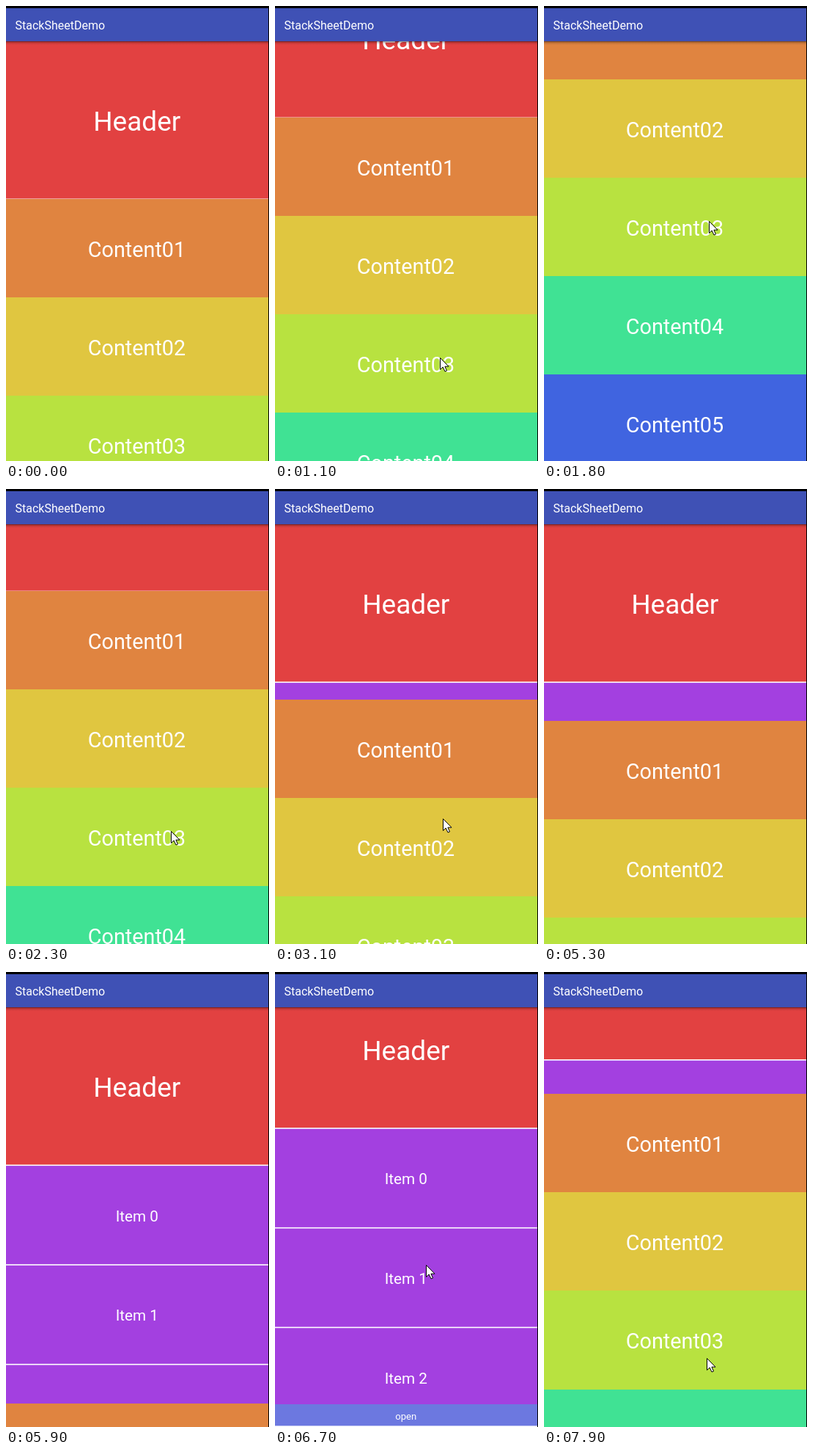
These frames come from a looping animation (359 px wide and 620 px high, 8 s). An HTML page with a canvas:

```html
<!DOCTYPE html>
<html lang="en">
<head>
<meta charset="utf-8">
<title>Layered sheet scrolling</title>
<style>
html, body { margin: 0; width: 100%; height: 100%; overflow: hidden; background: #000; }
canvas { display: block; }
</style>
</head>
<body>
<canvas id="stage" width="359" height="620"></canvas>
<script>
const ctx = document.getElementById('stage').getContext('2d');
const LOOP = 8000, STEP = 100;
const WIDTH = 358, HEIGHT = 620, BAR_BOTTOM = 48, LIST_TOP = 263;
const BLOCK = 134.1, ITEM = 135.7, DIVIDER = 1.6;
const blockColors = ['#e08440', '#e0c640', '#b8e240', '#40e294', '#4064e0'];

const ramp = (t, from, to) => Math.min(1, Math.max(0, (t - from) / (to - from)));
const smooth = u => u * u * (3 - 2 * u);
const easeOut = u => 1 - (1 - u) ** 1.71;
const tug = (t, from, to, peak) => peak * Math.sin(Math.PI * ramp(t, from, to));

// How far the page is scrolled up
function scrollAt(t) {
  if (t < 1800) return 297 * ramp(t, 0, 1800) ** 2;
  if (t < 2700) return 297 * (1 - smooth(ramp(t, 1800, 2700)));
  return 143.5 * smooth(ramp(t, 6235, 7400));
}

// How far the sheet is dragged down from its resting place
function pullAt(t) {
  return tug(t, 2700, 3700, 25.2) + tug(t, 3700, 4900, 51.8) + 81 * ramp(t, 4900, 5400) ** 1.9;
}

function sheetTop(t) {
  const rest = LIST_TOP - scrollAt(t);
  if (t > 7600) return HEIGHT + (rest - HEIGHT) * easeOut(ramp(t, 7600, 8000));
  const pulled = rest + pullAt(t);
  return pulled + (HEIGHT - pulled) * easeOut(ramp(t, 5400, 6100));
}

const gestures = [
  { from: 100, to: 2300, x: () => 225, y: t => 590 - scrollAt(t) },
  { from: 2700, to: 5200, x: t => 229 - 29 * ramp(t, 3100, 4400), y: t => 426.8 + 0.92 * pullAt(t) },
  { from: 6300, to: 7000, x: () => 206, y: t => 449.4 - scrollAt(t) },
  { from: 7700, to: 7900, x: () => 222, y: t => 575 - 49 * ramp(t, 7700, 7900) }
];

function rect(color, y, height) {
  ctx.fillStyle = color;
  ctx.fillRect(0, y, WIDTH, height);
}

function label(text, baseline, size, x = 178.8, align = 'center') {
  ctx.font = `${size}px Roboto, sans-serif`;
  ctx.textAlign = align;
  ctx.fillStyle = '#fff';
  ctx.fillText(text, x, baseline);
}

function drawList(offset) {
  const top = LIST_TOP - 0.5 - offset;
  rect('#e24141', BAR_BOTTOM - offset, LIST_TOP - BAR_BOTTOM);
  label('Header', 170 - offset, 37);
  for (let i = 0; top + i * ITEM < HEIGHT; i++) {
    const y = top + i * ITEM;
    rect('#a340e0', y + DIVIDER / 2, ITEM);
    rect('#fff', y, DIVIDER);
    label('Item ' + i, y + 77, 20.7);
  }
}

function drawSheet(top) {
  blockColors.forEach((color, i) => {
    const y = Math.round(top + i * BLOCK);
    rect(color, y, BLOCK + 1);
    label('Content0' + (i + 1), y + 78.5, 28.8, 178.5);
  });
}

function drawOpenBar() {
  rect('#6c78e0', 589, 30);
  rect('#fff', 618.4, 1.6);
  label('open', 609.5, 13.1);
}

function drawToolbar() {
  const shadow = ctx.createLinearGradient(0, BAR_BOTTOM, 0, BAR_BOTTOM + 5);
  shadow.addColorStop(0, 'rgba(0,0,0,.5)');
  shadow.addColorStop(0.4, 'rgba(0,0,0,.15)');
  shadow.addColorStop(1, 'rgba(0,0,0,0)');
  rect(shadow, BAR_BOTTOM, 5);
  rect('#000', 0, 3);
  rect('#3f51b5', 3, BAR_BOTTOM - 3);
  label('StackSheetDemo', 32, 16, 12.5, 'left');
}

const arrow = new Path2D('M.5 .5V16.5L4.2 13L7 19L9.5 18L6.9 12.2H12Z');

function drawPointer(t) {
  const gesture = gestures.find(g => t >= g.from && t <= g.to);
  if (!gesture) return;
  ctx.save();
  ctx.translate(Math.round(gesture.x(t)), Math.round(gesture.y(t)));
  ctx.fillStyle = '#fff';
  ctx.strokeStyle = '#000';
  ctx.fill(arrow);
  ctx.stroke(arrow);
  ctx.restore();
}

function draw(now) {
  const t = Math.floor(now % LOOP / STEP) * STEP;
  ctx.fillStyle = '#000';
  ctx.fillRect(0, 0, 359, HEIGHT);
  drawList(scrollAt(t));
  drawSheet(sheetTop(t));
  if (t >= 6100 && t < 7700) drawOpenBar();
  drawToolbar();
  drawPointer(t);
}

const start = performance.now();
function frame() {
  draw(performance.now() - start);
  requestAnimationFrame(frame);
}
frame();
</script>
</body>
</html>
```
